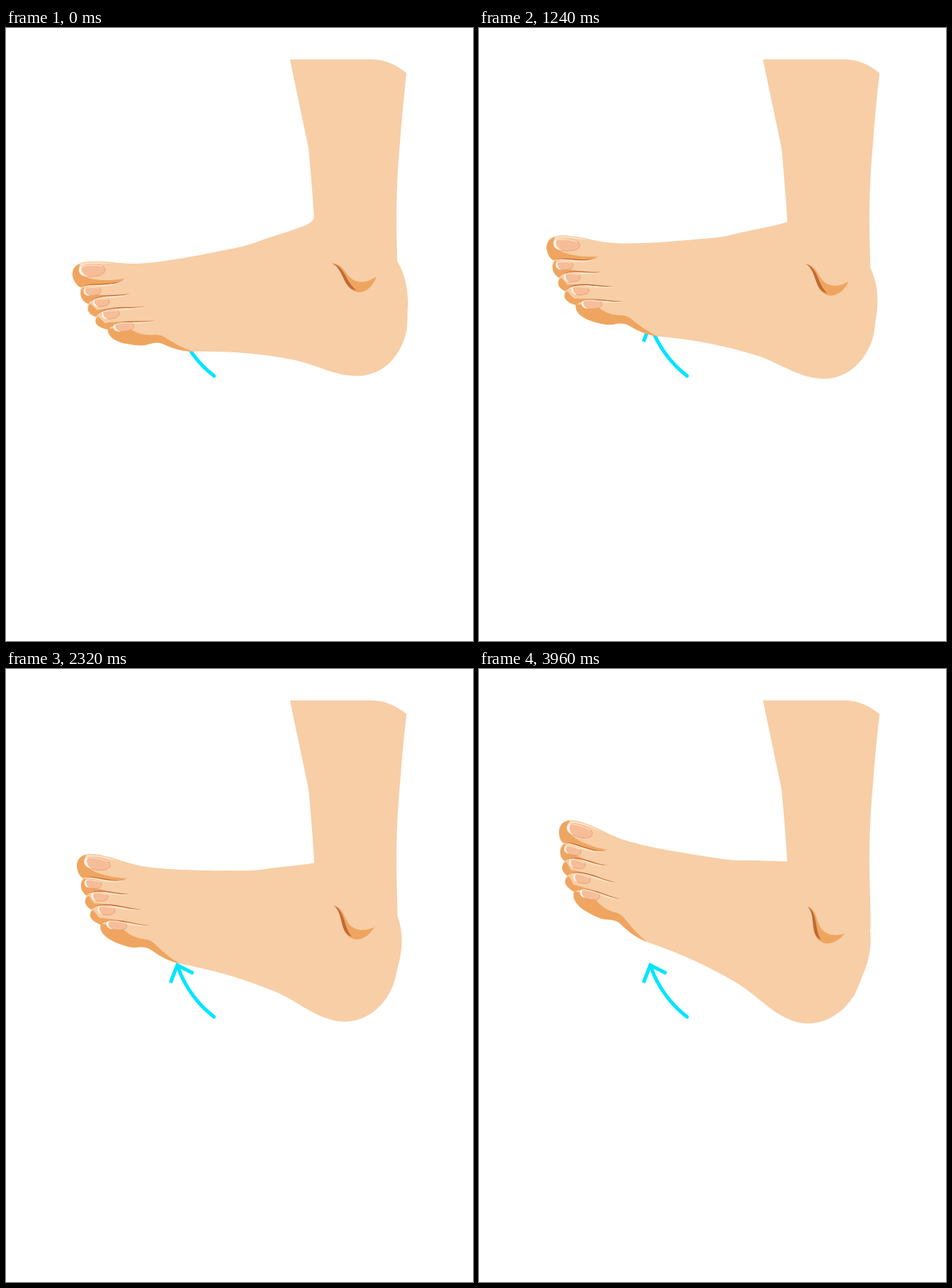
Animation of 653x858 px, one loop 4 s. Source, as an HTML page with a canvas:

```html
<!DOCTYPE html>
<html lang="en">
<head>
<meta charset="utf-8">
<title>Foot flexing</title>
<style>
  html, body { margin: 0; width: 100%; height: 100%; overflow: hidden; background: #fff; }
  canvas { display: block; width: 653px; height: 858px; }
</style>
</head>
<body>
<canvas id="stage" width="653" height="858"></canvas>
<script>
const ctx = document.getElementById('stage').getContext('2d');

const LOOP = 4000, STEP = 40, STEPS = LOOP / STEP;
const PIVOT = { x: 450, y: 340 };
const MAX_ANGLE = 20 * Math.PI / 180;

const SKIN = '#f7cea6', SHADE = '#efa560', DARK = '#bf6a34';
const NAIL = '#f6bd98', RIM = '#e39b72', LIGHT = '#fee3c4', SHINE = '#fff3e4', CYAN = '#00e5ff';

const leg = 'M397 44H512C532 44 547 53 560 63C556 100 553 130 551 160C547 200 546 240 546 275' +
  'C546 305 548 335 547.5 364L500 380L436 310L431 270C429 235 426 200 423 168Z';

const foot = 'M431 264C431 271 421 275.5 410 279.5C388 287.5 366 293.5 345 301.5C331 306.5 315 309 300 312' +
  'C267 319 220 327.5 190 329.5C160 331 146 326 128 326.5C112 326 98 328 94 338C91 349 98 361 105.5 363' +
  'C101 369 105 382 115 386.5C113 394 117 402 125.5 404C123 412 131 421 142.5 422C142 432 153 438.5 166 441.5' +
  'C179 444 190 445.5 198 443C207 440 213 439.5 220 442.5C234 449 247 452.5 262 453C310 452 352 455 400 464' +
  'C434 471 459 487 491 487C530 487 554 455 560 424C562 412 561 402 562 385C562 362 557 344 548 328' +
  'L500 280Z';

const bigToeShade = 'M103 330C92 335 91 345 95 353C98 359 102 363 105.5 363C117 356 150 363 166 350.5' +
  'C152 354 128 354 116 350C106 346 100 340 103 330Z';
const bigToeShine = 'M103 331C116 327 135 327 150 330C136 329 120 329 103 333Z';

const soleShade = 'M142.5 421C142 432 153 438.5 166 441.5C179 444 190 445.5 198 443C207 440 213 439.5 220 442.5' +
  'C234 449 247 452.5 262 453C244 447 234 440 225 435C212 425 204 432 190 428.5C180 426 174 421 168 419Z';

const ankle = 'M456 329.5C476 330 474 355 497 355.5C505 355.5 512 352 518 347.5' +
  'C514 360 505 369.5 494 370C470 368 473 336 456 329.5Z';
const ankleFold = 'M456 329.5C474 333 475 356 490 367C471 366 473 337 456 329.5Z';

const shaft = 'M291 487C270 471 250 446 240 416';
const head = 'M230 439L239.5 414.5L262 426';

// Left edge and top of each small toe, the end of the crease above it, and how far that crease sags
const toes = [
  { x: 104, y: 363, tipX: 166, tipY: 351.5, sag: 7 },
  { x: 114, y: 386, tipX: 174.5, tipY: 371, sag: 2 },
  { x: 124.5, y: 404, tipX: 194, tipY: 389.5, sag: 0 },
  { x: 142, y: 422, tipX: 209, tipY: 409, sag: 0 }
];

const nails = [
  { x: 121, y: 339.5, rx: 18, ry: 8.3, tilt: -0.03 },
  { x: 121, y: 368.5, rx: 11.8, ry: 6.2, tilt: -0.08 },
  { x: 133.5, y: 384, rx: 11.3, ry: 6, tilt: -0.08 },
  { x: 146.5, y: 401, rx: 12, ry: 6.2, tilt: -0.08 },
  { x: 165, y: 418.5, rx: 14, ry: 6.2, tilt: -0.08 }
];

function fill(d, color) {
  ctx.fillStyle = color;
  ctx.fill(new Path2D(d));
}

function line(d, color, width, cap = 'round') {
  ctx.strokeStyle = color;
  ctx.lineWidth = width;
  ctx.lineCap = cap;
  ctx.stroke(new Path2D(d));
}

// Control points of the crease above a toe, from the left edge to its tip
function bend({ x, tipX, tipY, sag }, drop = 0) {
  return [
    `${x + 11} ${tipY - 4 + sag + drop}`,
    `${tipX - (tipX - x) * 0.26} ${tipY + 4.5 + sag + drop}`
  ];
}

// Sliver along the crease, pointed at both ends
function crease(toe, drop, thick) {
  const [a1, a2] = bend(toe, drop), [b1, b2] = bend(toe, drop + thick);
  const from = `${toe.x + 2} ${toe.y}`;
  return `M${from}C${a1} ${a2} ${toe.tipX} ${toe.tipY}C${b2} ${b1} ${from}Z`;
}

function toeShade({ x, y }, next) {
  const { x: nx, y: ny, tipX, tipY, sag } = next;
  const [c1, c2] = bend(next);
  return `M${x + 4} ${y}C${x - 3} ${y + 7} ${x + 1} ${ny - 3} ${nx + 1.5} ${ny}` +
    `C${c1} ${c2} ${tipX} ${tipY}` +
    `C${tipX - 22} ${tipY + 3 + sag} ${x + 30} ${tipY + 1 + sag} ${x + 14} ${y + 9}Z`;
}

function nail({ x, y, rx, ry, tilt }) {
  ctx.save();
  ctx.translate(x, y);
  ctx.rotate(tilt);
  const shape = `M${-rx} ${-ry * 0.5}C${-rx * 0.7} ${-ry * 1.15} ${rx * 0.3} ${-ry * 1.15} ${rx * 0.8} ${-ry * 0.75}` +
    `C${rx * 1.15} ${-ry * 0.2} ${rx} ${ry * 0.6} ${rx * 0.5} ${ry * 0.85}` +
    `C${-rx * 0.1} ${ry * 1.15} ${-rx * 0.6} ${ry} ${-rx * 0.8} ${ry * 0.6}` +
    `C${-rx} ${ry * 0.2} ${-rx * 1.08} ${-ry * 0.2} ${-rx} ${-ry * 0.5}Z`;
  fill(shape, NAIL);
  line(shape, RIM, 0.8);
  const edge = `M${-rx} ${-ry * 0.7}C${-rx * 1.2} ${ry * 0.1} ${-rx * 0.95} ${ry} ${-rx * 0.35} ${ry}` +
    `C${-rx * 0.8} ${ry * 0.6} ${-rx * 0.95} ${-ry * 0.1} ${-rx * 0.8} ${-ry * 0.8}Z`;
  fill(edge, SHINE);
  line(`M${-rx * 0.8} ${-ry * 0.75}Q0 ${-ry * 1.1} ${rx * 0.75} ${-ry * 0.7}`, LIGHT, 1.3);
  ctx.restore();
}

function drawFoot() {
  fill(foot, SKIN);
  fill(bigToeShade, SHADE);
  fill(bigToeShine, LIGHT);
  for (let i = 0; i < 3; i++) fill(toeShade(toes[i], toes[i + 1]), SHADE);
  fill(soleShade, SHADE);
  for (const toe of toes) {
    fill(crease(toe, 0.8, 4), LIGHT);
    fill(crease(toe, -0.6, 1.8), DARK);
  }
  nails.forEach(nail);
  fill(ankle, SHADE);
  fill(ankleFold, DARK);
}

function draw(now) {
  const step = Math.floor((now % LOOP) / STEP);
  ctx.fillStyle = '#fff';
  ctx.fillRect(0, 0, 653, 858);

  line(shaft, CYAN, 5);
  line(head, CYAN, 5, 'butt');
  fill(leg, SKIN);

  ctx.save();
  ctx.translate(PIVOT.x, PIVOT.y);
  ctx.rotate(MAX_ANGLE * step / (STEPS - 1));
  ctx.translate(-PIVOT.x, -PIVOT.y);
  drawFoot();
  ctx.restore();
}

const start = performance.now();
function tick() {
  draw(performance.now() - start);
  requestAnimationFrame(tick);
}
tick();
</script>
</body>
</html>
```
